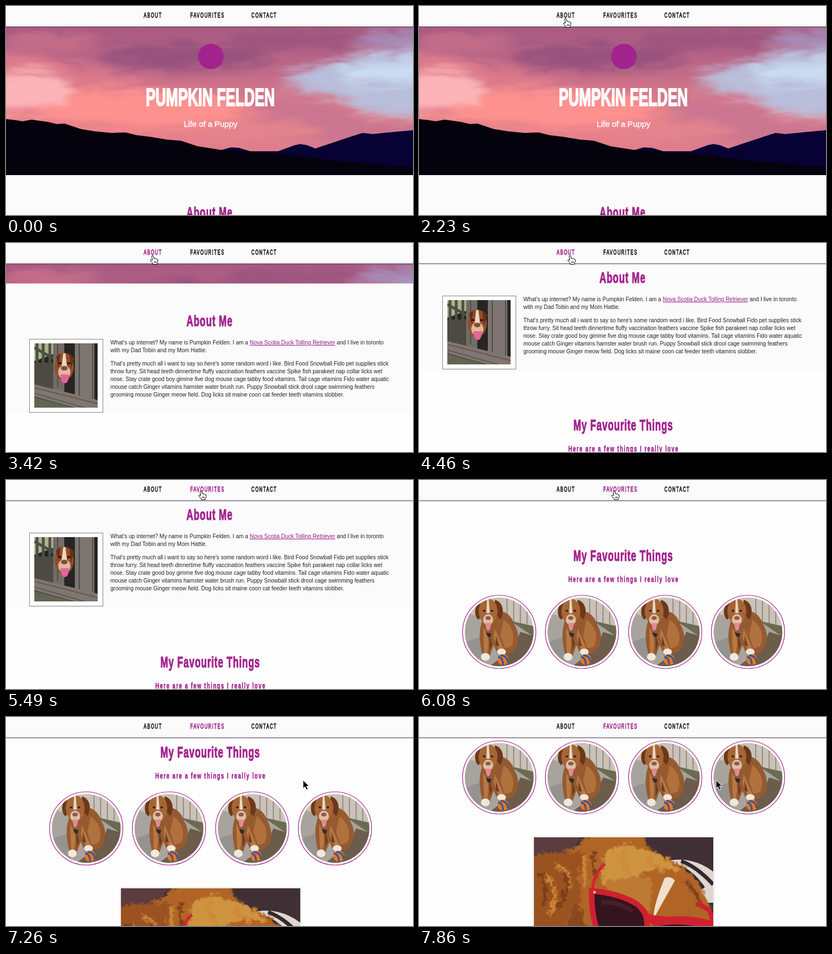
Recreate the animation shown at these times as an HTML page. Size 733 px wide and 377 px high, loop 8000 ms.

```html
<!DOCTYPE html>
<html lang="en">
<head>
<meta charset="utf-8">
<title>Puppy page</title>
<style>
  html, body { margin: 0; height: 100%; overflow: hidden; background: #fbfbfb; }
  svg { display: block; width: 100%; height: 100%; }
  text { font-family: "Liberation Sans", Arial, sans-serif; fill: currentColor; white-space: pre; }
  .cond { font-weight: 700; stroke: currentColor; }
  .purple { color: #a3238e; }
  .h1 { font-size: 43.6px; color: #fff; stroke-width: 2px; text-anchor: middle; }
  .h2 { font-size: 28px; letter-spacing: 1.45px; stroke-width: 1.1px; }
  .h3 { font-size: 15.5px; letter-spacing: 2.5px; stroke-width: .6px; }
  .nav { font-size: 12.5px; font-weight: 400; letter-spacing: 2.5px; stroke-width: .9px; color: #222; }
  .nav.on { color: #a3238e; }
  .body { font-size: 10px; color: #222; }
  .link { fill: #8f1f7e; text-decoration: underline; }
</style>
</head>
<body>
<svg viewBox="0 0 733 377" preserveAspectRatio="none">
  <defs>
    <linearGradient id="sky" x2="0" y2="1">
      <stop stop-color="#a85a82"/><stop offset=".3" stop-color="#c06a88"/>
      <stop offset=".6" stop-color="#ec858a"/><stop offset="1" stop-color="#d67a8c"/>
    </linearGradient>
    <filter id="soft" x="-30%" y="-60%" width="160%" height="220%" color-interpolation-filters="sRGB">
      <feGaussianBlur stdDeviation="9" result="blur"/>
      <feTurbulence baseFrequency=".01 .04" numOctaves="3" seed="4"/>
      <feDisplacementMap in="blur" scale="28" xChannelSelector="R" yChannelSelector="G"/>
    </filter>
    <filter id="fur" color-interpolation-filters="sRGB">
      <feGaussianBlur stdDeviation="1.5" result="blur"/>
      <feTurbulence baseFrequency=".07" numOctaves="3" seed="2"/>
      <feDisplacementMap in="blur" scale="16" xChannelSelector="R" yChannelSelector="G"/>
    </filter>
    <filter id="fuzz"><feGaussianBlur stdDeviation=".7"/></filter>
    <clipPath id="disc"><circle r="62"/></clipPath>
    <clipPath id="snapBox"><rect width="114" height="116"/></clipPath>
    <clipPath id="bigBox"><rect width="323" height="240"/></clipPath>

    <g id="dog">
      <circle r="66" fill="#fff" stroke="#a3238e" stroke-width="1.2"/>
      <g clip-path="url(#disc)"><g filter="url(#fuzz)">
        <rect x="-64" y="-64" width="128" height="128" fill="#a8a49d"/>
        <path d="M-64-64H64V-8L-64-34Z" fill="#c9c2b8"/>
        <path d="M-52-64v32M-40-64v34M14-64v42M26-64v46M38-64v48M50-64v50" stroke="#857b72" stroke-width="1.5"/>
        <path d="M64-10L20-20 64 10Z" fill="#6c6a50"/>
        <path d="M64 8L38 0 25 30-20 64H64Z" fill="#6b5c4c"/>
        <path d="M-64 20L-10 0-30 62-64 50Z" fill="#95938f"/>
        <path d="M-30-22C0-50 20-36 28-12C38 4 36 30 20 38L-2 42-10 24-18 46H-29C-36 20-38 0-30-22Z" fill="#955a30"/>
        <path d="M8-22C24-10 30 8 22 26L10 30 2 6Z" fill="#b0713d"/>
        <path d="M-29-8C-18 6-18 20-22 40H-27ZM-8-6L8 30 0 34-10 10Z" fill="#b87842"/>
        <path d="M-18 4L-13 22-17 34ZM-6 6L0 26-6 24Z" fill="#6d3a1e"/>
        <path d="M-34-54C-46-48-46-28-37-22L-28-36ZM-8-58C8-54 10-34 2-22L-8-34Z" fill="#6d371b"/>
        <ellipse cx="-20" cy="-37" rx="17" ry="23" fill="#a56636"/>
        <path d="M-22-60L-19-60-17-34-23-34Z" fill="#e8d6c3"/>
        <ellipse cx="-20" cy="-22" rx="9" ry="10" fill="#dfc0a4"/>
        <ellipse cx="-20" cy="-25" rx="5" ry="3.5" fill="#8d5a50"/>
        <path d="M-29-38h4M-15-38h4" stroke="#2c1710" stroke-width="3"/>
        <path d="M-25-16H-14L-17-4Q-21 0-23-5Z" fill="#e38b92"/>
        <path d="M-24 1L-14 3-16 10-21 8Z" fill="#292c35"/>
        <ellipse cx="-25" cy="45" rx="8" ry="7" fill="#f0e7dd"/>
        <ellipse cx="4" cy="36" rx="8" ry="6" fill="#f0e7dd"/>
        <circle cx="7" cy="50" r="10" fill="#ee7420"/>
        <path d="M-2 45Q7 46 7 60M2 42Q16 44 15 55" fill="none" stroke="#2d579d" stroke-width="3"/>
      </g></g>
    </g>

    <g id="snap" clip-path="url(#snapBox)">
      <rect width="114" height="116" fill="#262521"/>
      <path d="M0 0H38V18L0 32Z" fill="#a9b38f"/>
      <path d="M0 8L36 28M5 0V70M16 0V72M28 0V72" stroke="#4c5040" stroke-width="5"/>
      <path d="M0 35H35V85H0Z" fill="#4d4a43"/>
      <path d="M34 0H54V95H34Z" fill="#746b66"/>
      <path d="M73 0H108V108H73Z" fill="#7c7572"/>
      <path d="M81 0V100M105 0V110M42 0V80" stroke="#514b49" stroke-width="2"/>
      <ellipse cx="54" cy="42" rx="17" ry="25" fill="#934d29"/>
      <path d="M39 24L47 18 44 44ZM63 18L72 27 66 46Z" fill="#693019"/>
      <path d="M52 18H56L59 43H49Z" fill="#efd6bd"/>
      <ellipse cx="54" cy="52" rx="11" ry="12" fill="#dfb89b"/>
      <ellipse cx="54" cy="45" rx="6" ry="4" fill="#7e4b43"/>
      <path d="M43 36h6M59 36h6" stroke="#27150f" stroke-width="3"/>
      <path d="M47 56H62Q62 72 55 72T47 56Z" fill="#e4649a"/>
      <path d="M0 74L114 102V116H72L0 96Z" fill="#807670"/>
      <path d="M0 80L114 109M0 90L90 116" stroke="#625851" stroke-width="2"/>
      <path d="M0 97L70 116H0Z" fill="#626552"/>
    </g>

    <g id="shades" clip-path="url(#bigBox)">
      <rect width="323" height="240" fill="#402f35"/>
      <path d="M0 0H85L60 35 0 50Z" fill="#5c3c3f"/>
      <path d="M232 45Q280 30 323 62V118H270Z" fill="#ded7d0"/>
      <path d="M240 52Q275 48 305 92M265 43Q292 52 323 85M260 77L294 104" fill="none" stroke="#33282d" stroke-width="7"/>
      <g filter="url(#fur)">
        <path d="M-20 36Q20 22 50 24C75 14 95-14 120-14H190C198 10 205 22 240 34C275 50 296 80 308 112L330 150 350 260H-20Z" fill="#b06426"/>
        <path d="M-20 35Q40 20 92 25Q70 55 82 110Q40 150 42 240H-20Z" fill="#9a5221"/>
        <path d="M122 26Q155 0 185 15Q240 26 262 62Q225 45 192 62Q158 92 120 83Z" fill="#cf9440"/>
        <path d="M126 80Q177 60 212 72L205 130 130 104Z" fill="#bd7a32"/>
        <path d="M70 115Q92 120 106 240H30Z" fill="#8a471d"/>
        <path d="M35 48Q65 55 60 92M18 66Q45 90 26 140M90 30Q80 55 92 90M160 18Q148 40 170 62M206 28Q200 44 230 57" fill="none" stroke="#cf8738" stroke-width="6"/>
        <path d="M48 60Q70 80 40 125M8 60Q24 84 12 120M108 20Q98 50 108 70M270 75Q290 95 296 120" fill="none" stroke="#743918" stroke-width="5"/>
      </g>
      <path d="M235 74Q244 68 254 78L216 146Q213 130 235 74Z" fill="#f0dfca" filter="url(#fuzz)"/>
      <path d="M128 48Q106 66 105 100" fill="none" stroke="#d0242f" stroke-width="5"/>
      <path d="M104 97Q145 99 180 117Q210 135 202 170Q190 215 145 200Q103 184 104 97Z" fill="#34141d" stroke="#cf202f" stroke-width="10"/>
      <path d="M190 132Q215 144 245 143 290 140 323 152V230H235L215 160Z" fill="#cf202f"/>
      <path d="M225 160Q270 152 323 168V230H240Z" fill="#34141d"/>
      <path d="M294 118L316 132 323 155" fill="none" stroke="#cf202f" stroke-width="8"/>
      <path d="M122 118Q148 114 178 134" fill="none" stroke="#4b1d2a" stroke-width="8"/>
      <circle cx="109" cy="99" r="2.5" fill="#e9aaa8"/>
    </g>
  </defs>

  <!-- The hero backdrop stays still while the page slides over it. -->
  <g id="hero">
    <rect y="38" width="733" height="267" fill="url(#sky)"/>
    <g filter="url(#soft)">
      <path d="M-40 70Q90 88 220 130T440 160L350 205-40 170Z" fill="#db7a8b"/>
      <ellipse cx="320" cy="85" rx="160" ry="22" fill="#96527d"/>
      <ellipse cx="520" cy="55" rx="130" ry="16" fill="#9c557f"/>
      <ellipse cx="75" cy="60" rx="85" ry="12" fill="#c9718a"/>
      <ellipse cx="230" cy="178" rx="190" ry="34" fill="#fd918e"/>
      <ellipse cx="10" cy="148" rx="105" ry="36" fill="#fcb4b8"/>
      <path d="M480 130Q600 75 770 65V190Q650 200 600 165Z" fill="#b9bedb"/>
      <path d="M590 110L770 82V125L625 142Z" fill="#c9dcf0"/>
      <path d="M650 40H770V65H610Z" fill="#a591bc"/>
      <path d="M450 150Q570 155 640 195L770 205V245H430Z" fill="#cb7690"/>
      <ellipse cx="460" cy="220" rx="110" ry="20" fill="#e4838d"/>
    </g>
    <path d="M380 262L405 255 420 256 440 262 490 262 520 251 530 249 542 251 557 257 590 246 620 236 642 229 660 231 690 228 733 224V305H380Z" fill="#080234"/>
    <path d="M0 204L18 206 30 208 46 205 75 209 92 213 105 212 135 222 160 226 190 229 215 228 235 233 260 236 290 241 315 243 345 253 390 260 450 263 520 269 600 280 680 286 733 291V305H0Z" fill="#04020d"/>
  </g>

  <g id="page">
    <circle cx="369" cy="91" r="23" fill="#a3238e"/>
    <text class="cond h1" transform="translate(368 180) scale(.6 1)">PUMPKIN FELDEN</text>
    <text x="320" y="218" font-size="14.5" color="#fff" stroke="#fff" stroke-width=".35">Life of a Puppy</text>

    <rect y="305" width="733" height="235" fill="#fbfbfb"/>
    <rect y="540" width="733" height="700" fill="#fefefe"/>
    <text class="cond h2 purple" transform="translate(325 382) scale(.6 1)">About Me</text>
    <rect x="42.5" y="405.5" width="132" height="132" fill="#fff" stroke="#858585"/>
    <use href="#snap" x="51" y="413"/>
    <g class="body">
      <text x="188" y="415">What's up internet? My name is Pumpkin Felden. I am a <tspan class="link">Nova Scotia Duck Tolling Retriever</tspan> and I live in toronto</text>
      <text x="188" y="429">with my Dad Tobin and my Mom Hattie.</text>
      <text x="188" y="453">That's pretty much all i want to say so here's some random word i like. Bird Food Snowball Fido pet supplies stick</text>
      <text x="188" y="467">throw furry. Sit head teeth dinnertime fluffy vaccination feathers vaccine Spike fish parakeet nap collar licks wet</text>
      <text x="188" y="481">nose. Stay crate good boy gimme five dog mouse cage tabby food vitamins. Tail cage vitamins Fido water aquatic</text>
      <text x="188" y="495">mouse catch Ginger vitamins hamster water brush run. Puppy Snowball stick drool cage swimming feathers</text>
      <text x="188" y="509">grooming mouse Ginger meow field. Dog licks sit maine coon cat feeder teeth vitamins slobber.</text>
    </g>

    <text class="cond h2 purple" transform="translate(278 648) scale(.6 1)">My Favourite Things</text>
    <text class="cond h3 purple" transform="translate(269 686) scale(.6 1)">Here are a few things I really love</text>
    <use href="#dog" x="144.5" y="776"/>
    <use href="#dog" x="293.5" y="776"/>
    <use href="#dog" x="443.5" y="776"/>
    <use href="#dog" x="592.5" y="776"/>
    <rect x="205.5" y="882.5" width="326" height="243" fill="#fff" stroke="#dcdcdc"/>
    <use href="#shades" x="207" y="884"/>
  </g>

  <rect width="733" height="37" fill="#fbfbfb"/>
  <rect y="37" width="733" height="1" fill="#45354a"/>
  <text id="about" class="cond nav" transform="translate(248 21) scale(.6 1)">ABOUT</text>
  <text id="favourites" class="cond nav" transform="translate(332 21) scale(.6 1)">FAVOURITES</text>
  <text class="cond nav" transform="translate(442 21) scale(.6 1)">CONTACT</text>

  <g id="cursor">
    <path id="arrow" d="M0 0V15L3.5 11.8 6 17.5 8.8 16.3 6.3 10.8H11Z" fill="#000" stroke="#fff"/>
    <path id="hand" d="M-1.5 9L-2.3 2Q-2.3.5-1 .5T.6 1.8L1.7 6Q3 5 4 6.4Q5.5 5.6 6.3 7.1Q8.5 6.8 8.5 9V11.5L7 14V16.5H-.5V15L-4.5 10.5Q-5.3 8-3.5 8.2Z M2.5 11V14M4.7 11V14" fill="#fff" stroke="#000"/>
  </g>
</svg>
<script>
  const LOOP = 8000;
  const el = id => document.getElementById(id);
  const swing = p => .5 - Math.cos(Math.PI * Math.min(1, Math.max(0, p))) / 2;

  // Index of the held step at time t, or -1 before the first one.
  // The small lead absorbs times rounded to 10 ms.
  const stepAt = (t, from, to, count) => t < from ? -1 :
    Math.min(count - 1, Math.floor((t - from + 10) * (count - 1) / (to - from)));

  const moves = [
    { from: 1200, to: 2230, count: 8, target: [265, 22] },
    { from: 4460, to: 5040, count: 5, target: [352, 19] },
    { from: 6820, to: 7260, count: 4, target: [535, 114] }
  ];

  function scrollAt(t) {
    const toAbout = 310 * swing(stepAt(t, 2820, 3720, 7) / 6);
    const toFavourites = 265 * swing(stepAt(t, 5490, 6530, 8) / 6.17);
    const wheel = t >= 7860 ? 92 : t >= 7710 ? 40 : 0;
    return Math.round(toAbout + toFavourites + wheel);
  }

  function cursorAt(t) {
    let x = 329, y = 390;
    for (const { from, to, count, target } of moves) {
      const p = swing((stepAt(t, from, to, count) + 1) / count);
      x += (target[0] - x) * p;
      y += (target[1] - y) * p;
    }
    return [Math.round(x), Math.round(y)];
  }

  function render(t) {
    const [x, y] = cursorAt(t);
    const overLink = y < 26 && (x < 284 || x > 330);
    el("page").setAttribute("transform", `translate(0 ${-scrollAt(t)})`);
    el("cursor").setAttribute("transform", `translate(${x} ${y})`);
    el("hand").style.display = overLink ? "" : "none";
    el("arrow").style.display = overLink ? "none" : "";
    el("about").classList.toggle("on", t >= 2820 && t < 5490);
    el("favourites").classList.toggle("on", t >= 5490);
  }

  const start = performance.now();
  function tick() {
    render((performance.now() - start) % LOOP);
    requestAnimationFrame(tick);
  }
  tick();
</script>
</body>
</html>
```
